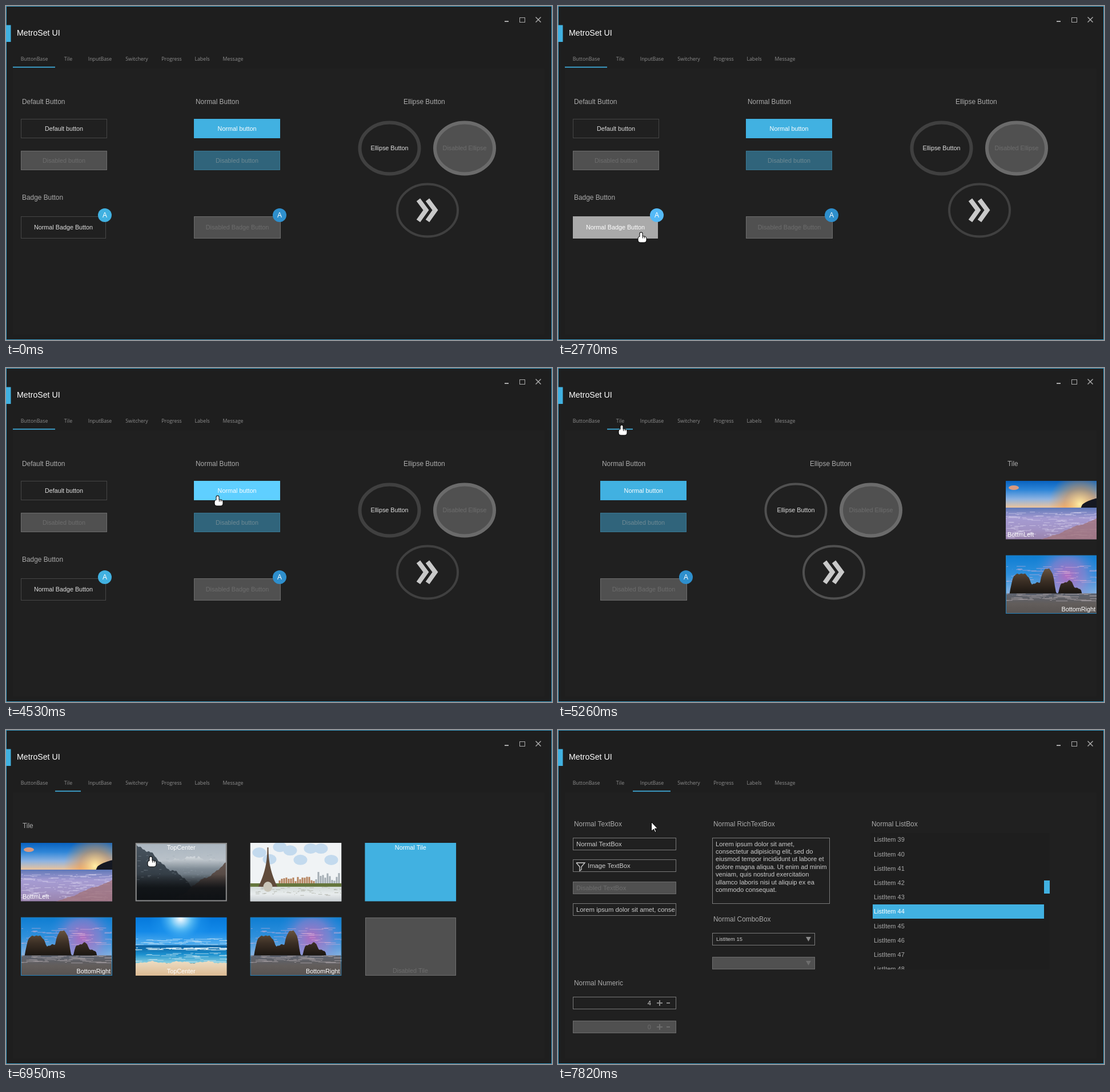
Write an HTML page with a canvas that moves like this. It is 956 by 586 pixels and loops after 8000 ms.

```html
<!DOCTYPE html>
<html lang="en">
<head>
<meta charset="utf-8">
<title>MetroSet UI</title>
<style>
html, body { margin: 0; width: 100%; height: 100%; overflow: hidden; background: #1e1e1e; }
canvas { display: block; }
</style>
</head>
<body>
<canvas id="stage" width="956" height="586"></canvas>
<script>
const c = document.getElementById('stage').getContext('2d');
const LOOP = 8000, PAGE_GAP = 1013, SLIDE_MS = 393;
const SLIDES = [5162, 7420];              // start of each page change
const BLUE = '#41b1e1', GREY = '#aaa', FILL = '#202020', INK = '#ccc', OFF = '#505050', OFF_INK = '#6d6d6d';
const SANS = '"Liberation Sans", Arial, sans-serif';
const TAB_FONT = '"Open Sans", "Noto Sans", sans-serif';

// Pointer moves: start, duration, then where it comes to rest
const MOVES = [
  [200, 730, 100, 244], [930, 90, 100, 220], [1320, 380, 400, 222], [1700, 420, 284, 278],
  [2120, 650, 145, 397], [2860, 150, 262, 396], [3010, 690, 722, 184], [3700, 110, 740, 218],
  [3870, 280, 737, 362], [4250, 500, 84, 116], [4750, 150, 111, 100], [5430, 140, 111, 173],
  [5620, 380, 115, 370], [6000, 350, 500, 380], [6350, 150, 505, 275], [6500, 280, 253, 222],
  [6950, 250, 146, 98], [7580, 160, 163, 161]
];
let mouse, hand, sliding;

function rect(x, y, w, h, fill, border) {
  c.fillStyle = fill;
  c.fillRect(x, y, w, h);
  if (border) {
    c.strokeStyle = border;
    c.lineWidth = 1;
    c.strokeRect(x + .5, y + .5, w - 1, h - 1);
  }
}
function text(s, x, y, color, size = 10.8, align = 'left', family = SANS) {
  c.font = `${size}px ${family}`;
  c.textAlign = align;
  c.fillStyle = color;
  c.fillText(s, x, y + size * .36);
}
const label = (s, x, y) => text(s, x, y, GREY, 11.9);
function poly(points, fill, stroke, width = 1) {
  c.beginPath();
  points.forEach(([x, y]) => c.lineTo(x, y));
  if (fill) { c.closePath(); c.fillStyle = fill; c.fill(); }
  if (stroke) { c.strokeStyle = stroke; c.lineWidth = width; c.stroke(); }
}
function oval(x, y, rx, ry, fill, border, width) {
  c.beginPath();
  c.ellipse(x, y, rx, ry, 0, 0, 7);
  c.fillStyle = fill;
  c.fill();
  if (border) { c.strokeStyle = border; c.lineWidth = width; c.stroke(); }
}
function clipped(x, y, w, h, draw) {
  c.save();
  c.beginPath();
  c.rect(x, y, w, h);
  c.clip();
  draw();
  c.restore();
}
function blend(gradient, colors) {
  colors.forEach((color, i) => gradient.addColorStop(i / (colors.length - 1), color));
  return gradient;
}
const fade = (y0, y1, ...colors) => blend(c.createLinearGradient(0, y0, 0, y1), colors);
const glow = (x, y, r, ...colors) => blend(c.createRadialGradient(x, y, 0, x, y, r), colors);

function hot(inside) {
  if (inside) hand = true;
  return inside;
}
const hotRect = (x, y, w, h) =>
  hot(!sliding && mouse.x >= x && mouse.x < x + w && mouse.y >= y && mouse.y < y + h);
const hotOval = (x, y, rx, ry) =>
  hot(!sliding && Math.hypot((mouse.x - x) / rx, (mouse.y - y) / ry) < 1);

// Buttons page
function button(s, x, y, w, h, kind) {
  let look = { plain: [FILL, '#464646', '#ddd'], blue: [BLUE, BLUE, '#fff'],
    off: [OFF, OFF_INK, OFF_INK], blueOff: ['#30647b', '#3a7893', '#6f8a94'] }[kind];
  const over = !/off/i.test(kind) && hotRect(x, y, w, h);
  if (over) look = kind === 'blue' ? ['#5fcfff', '#5fcfff', '#fff'] : [GREY, GREY, '#fff'];
  rect(x, y, w, h, look[0], look[1]);
  text(s, x + w / 2, y + h / 2, look[2], 10.8, 'center');
  return over;
}
function badge(x, color) {
  oval(x, 367, 12, 12, color);
  text('A', x, 366.5, '#fff', 12, 'center');
}
function ellipseButton(s, x, y, width, ink = '#ddd') {
  const over = hotOval(x, y, 55, 48);
  const ring = over ? GREY : sliding ? '#505050' : '#404040';
  oval(x, y, 55 - width / 2, 48 - width / 2, over ? GREY : FILL, ring, width);
  text(s, x, y, over ? '#fff' : ink, 10.8, 'center');
}
function buttonsPage() {
  label('Default Button', 28, 168);
  label('Normal Button', 332, 168);
  label('Ellipse Button', 696, 168);
  label('Badge Button', 28, 336);
  button('Default button', 26, 198, 151, 34, 'plain');
  button('Disabled button', 26, 254, 151, 34, 'off');
  button('Normal button', 329, 198, 151, 34, 'blue');
  button('Disabled button', 329, 254, 151, 34, 'blueOff');
  const over = button('Normal Badge Button', 26, 369, 149, 39, 'plain');
  badge(173, over ? '#55baf7' : BLUE);
  button('Disabled Badge Button', 329, 369, 152, 39, 'off');
  badge(479, '#2e8fcd');
  ellipseButton('Ellipse Button', 671.5, 249.5, sliding ? 4 : 6);
  oval(803, 249.5, 52, 45, OFF, '#6b6b6b', 6);
  text('Disabled Ellipse', 803, 249.5, OFF_INK, 10.8, 'center');
  ellipseButton('', 738, 358.5, 4);
  for (const x of [722, 738]) poly([[x, 340], [x + 13.5, 358], [x, 377]], null, '#c9c9c9', 8);
}

// Pictures, 160 by 103, built from ridges and seeded specks
const random = n => Math.abs(Math.sin(n * 12.9898) * 43758.5453) % 1;
const rough = (x, seed) => Math.sin(x * .13 + seed) + Math.sin(x * .31 + seed * 2) / 2 + Math.sin(x * .9 + seed * 3) / 3;
const hump = (x, middle, half, height) => Math.max(0, height * (1 - ((x - middle) / half) ** 4));

function ridge(fill, top) {
  const points = [[160, 103], [0, 103]];
  for (let x = 0; x <= 160; x += 2) points.push([x, top(x)]);
  poly(points, fill);
}
function specks(count, color, y0, y1, length) {
  for (let i = 0; i < count; i++) {
    const w = length * random(i + 9);
    rect(random(i + 1) * 170 - 10, y0 + random(i + .5) * (y1 - y0), w, 1, color);
  }
}
function sunset() {
  rect(0, 0, 160, 48, fade(0, 48, '#0862c0', '#2f86d8', '#8db3e2', '#f3c596'));
  rect(60, 0, 100, 48, glow(130, 41, 55, '#fff0a8', '#f59a4088', '#f59a4000'));
  oval(14, 12, 9, 4, '#d99a80');
  ridge('#151822', x => x < 132 ? 60 : 46 - 3 * Math.sqrt(x - 132));
  rect(0, 47, 160, 56, fade(47, 103, '#5f78b8', '#a59bd2', '#a294c6', '#9a83ac'));
  specks(200, '#e0daf088', 54, 100, 16);
  ridge('#a0747ccc', x => 128 - x * .39 + rough(x, 2));
}
function mountains() {
  rect(0, 0, 160, 60, fade(0, 60, '#a9b4be', '#c9cfd4'));
  ridge(fade(22, 70, '#dde2e6', '#7e8a94', '#59646d'), x => 34 - hump(x, 84, 22, 8) - hump(x, 122, 25, 7) + 3 * rough(x, 4));
  ridge(fade(0, 100, '#4a5661', '#37414a', '#1d2226'), x => x * .75 + 3 * rough(x, 1));
  specks(90, '#96a3ad66', 20, 70, 6);
  ridge(fade(36, 100, '#645650', '#382f2d'), x => 36 + (160 - x) * .68 + 2 * rough(x, 3));
  rect(0, 55, 160, 48, fade(55, 103, '#0e111400', '#0e1114dd', '#0e1114'));
}
function city() {
  rect(0, 0, 160, 103, '#f0f3f5');
  for (let i = 0; i < 8; i++) oval(16 + i * 18, 17 + 13 * Math.sin(i * 2), 12, 9, '#c3daee');
  for (let x = 50; x < 156; x += 4) {
    const h = 6 + 10 * random(x) + (x > 115 ? 12 * random(x + 1) : 0);
    rect(x, 75 - h, 3, h, x > 110 ? '#a4adb4' : '#b5835e');
  }
  rect(0, 71, 160, 6, '#65763d');
  rect(0, 77, 160, 26, fade(77, 103, '#d5dcda', '#e8eced', '#c6ccd0'));
  specks(60, '#b5b8b0', 77, 92, 8);
  for (let y = 8; y < 77; y++) {
    const half = 1 + 16 * ((y - 8) / 69) ** 2.2;
    rect(31 - half, y, half * 2, 1, '#604b3b');
  }
  oval(31, 77, 8, 9, '#c9c5b8');
}
function rocks() {
  rect(0, 0, 160, 68, fade(0, 68, '#0e7dd2', '#2f90dc', '#8fb6e2'));
  rect(0, 0, 160, 68, glow(108, 36, 62, '#b06cc0', '#9a80cc99', '#278ee000'));
  specks(60, '#e0b4d888', 18, 48, 26);
  ridge(fade(22, 70, '#6a5540', '#3a2e24', '#17130f'), x => 70 - 2.5 * rough(x, 5) -
    Math.max(hump(x, 28, 22, 36), hump(x, 73, 15, 43), hump(x, 50, 42, 22), hump(x, 106, 15, 24), hump(x, 124, 10, 12)));
  rect(0, 67, 160, 36, fade(67, 103, '#5d6370', '#625d5b', '#575250'));
  specks(60, '#9a9498', 67, 80, 26);
  c.strokeStyle = '#2582bd';
  c.lineWidth = 1;
  c.strokeRect(.5, .5, 159, 101.5);
}
function sea() {
  rect(0, 0, 160, 50, fade(0, 50, '#0579dc', '#1389e8', '#5ab2ee'));
  rect(0, 0, 160, 50, glow(79, 2, 55, '#ffffff', '#5dbdf4', '#239aef66', '#239aef00'));
  specks(50, '#cfe6f599', 37, 49, 30);
  rect(0, 49, 160, 32, fade(49, 81, '#0c5f9f', '#1b90cf', '#8fd3e2'));
  specks(45, '#e6f4f8', 53, 57, 26);
  specks(40, '#d9eff5aa', 62, 78, 26);
  ridge(fade(77, 103, '#ecdcc2', '#dcba92'), x => 79 + 1.5 * rough(x, 1));
}

// Tiles page
function tile(picture, col, row, s, align, bottom) {
  const x = 26 + col * 200.75, y = 198 + row * 130.5;
  clipped(x, y, 160, 102.5, () => {
    c.translate(x, y);
    picture();
  });
  if (hotRect(x, y, 160, 102)) {
    c.strokeStyle = '#8c8c8c';
    c.lineWidth = 2;
    c.strokeRect(x + 1, y + 1, 158, 100.5);
  }
  const inset = { left: 3, center: 80, right: 157 }[align];
  text(s, x + inset, y + (bottom ? 94.3 : 8), '#fff', 10.8, align);
}
function tilesPage() {
  label('Tile', 29, 168);
  tile(sunset, 0, 0, 'BottmLeft', 'left', true);
  tile(mountains, 1, 0, 'TopCenter', 'center');
  tile(city, 2, 0, '', 'center');
  tile(() => rect(0, 0, 160, 103, BLUE), 3, 0, 'Normal Tile', 'center');
  tile(rocks, 0, 1, 'BottomRight', 'right', true);
  tile(sea, 1, 1, 'TopCenter', 'center', true);
  tile(rocks, 2, 1, 'BottomRight', 'right', true);
  rect(629, 329, 159, 102, OFF, OFF_INK);
  text('Disabled Tile', 708, 422.5, OFF_INK, 10.8, 'center');
}

// Inputs page
const LOREM = ['Lorem ipsum dolor sit amet,', 'consectetur adipisicing elit, sed do',
  'eiusmod tempor incididunt ut labore et', 'dolore magna aliqua. Ut enim ad minim',
  'veniam, quis nostrud exercitation', 'ullamco laboris nisi ut aliquip ex ea', 'commodo consequat.'];

function field(x, y, w, h, off) {
  rect(x, y, w, h, off ? OFF : FILL, off ? OFF_INK : '#7a7a7a');
}
function textBox(s, y, off, indent = 0) {
  field(26, y, 181, 22, off);
  clipped(28, y, 177, 22, () => text(s, 32 + indent, y + 10.5, off ? OFF_INK : INK, 11.3));
}
function numeric(y, value, off) {
  const color = off ? OFF_INK : '#888';
  field(26, y, 181, 22, off);
  text(value, 163, y + 11, off ? color : INK, 11.2, 'right');
  rect(173, y + 10, 10, 2, color);
  rect(177, y + 6, 2, 10, color);
  rect(190, y + 10, 6, 2, color);
}
function combo(y, s, off) {
  field(270, y, 180, 22, off);
  text(s, 277, y + 11, INK, 9.4);
  poly([[434, y + 7], [443, y + 7], [438.5, y + 15]], off ? OFF_INK : '#888');
}
function listBox() {
  rect(547, 181, 314, 239, '#1e1e1e');
  for (let i = 0; i < 10; i++) {
    const y = 192.5 + i * 25.2, selected = i === 5;
    if (selected) rect(551, 306, 300, 25, BLUE);
    text('ListItem ' + (39 + i), 553, y, selected ? '#fff' : GREY, 11);
  }
  rect(851, 264, 10, 23, BLUE);
}
function inputsPage() {
  label('Normal TextBox', 28, 164.5);
  label('Normal RichTextBox', 272, 164.5);
  label('Normal ListBox', 549, 164.5);
  label('Normal ComboBox', 272, 331.5);
  label('Normal Numeric', 28, 444);
  textBox('Normal TextBox', 189);
  textBox('Image TextBox', 227, false, 20);
  poly([[32, 233], [47, 233], [41, 240], [41, 245], [38, 247], [38, 240], [32, 233]], null, INK, 1.3);
  textBox('Disabled TextBox', 266, true);
  textBox('Lorem ipsum dolor sit amet, consectetur', 304);
  field(270, 189, 206, 116);
  LOREM.forEach((line, i) => text(line, 276, 199.5 + i * 13.4, INK, 11.2));
  combo(356, 'ListItem 15');
  combo(398, '', true);
  numeric(468, '4');
  numeric(510, '0', true);
  clipped(547, 181, 314, 239, listBox);
}

// Window
const TABS = ['ButtonBase', 'Tile', 'InputBase', 'Switchery', 'Progress', 'Labels', 'Message'];
const TAB_EDGES = [12, 86, 131, 197, 260, 319, 367, 427];
const PAGES = [buttonsPage, tilesPage, inputsPage];

function chrome(page) {
  rect(0, 0, 956, 586, '#1e1e1e', '#3a9bc5');
  rect(12, 110, 931, 466, FILL);
  rect(0, 33.5, 8.5, 29.5, BLUE);
  text('MetroSet UI', 19, 47, '#fff', 14.2);
  rect(873, 26, 7, 2, GREY);
  c.strokeStyle = GREY;
  c.lineWidth = 1;
  c.strokeRect(899.5, 20.5, 9, 8);
  poly([[927.5, 19.5], [936.5, 28.5]], null, GREY, 1.5);
  poly([[936.5, 19.5], [927.5, 28.5]], null, GREY, 1.5);
  TABS.forEach((name, i) =>
    text(name, (TAB_EDGES[i] + TAB_EDGES[i + 1]) / 2 + .5, 92.5, '#8e8e8e', 8.8, 'center', TAB_FONT));
  rect(TAB_EDGES[page], 106.5, TAB_EDGES[page + 1] - TAB_EDGES[page], 1.7, BLUE);
}
function drawPage(index, offset) {
  c.save();
  c.translate(offset, 0);
  PAGES[index]();
  c.restore();
}
function pointerAt(t) {
  let x = 745, y = 572;
  for (const [start, duration, toX, toY] of MOVES) {
    const k = Math.min(1, Math.max(0, (t - start) / duration));
    x += (toX - x) * k;
    y += (toY - y) * k;
  }
  return { x: Math.round(x), y: Math.round(y) };
}
function drawPointer() {
  c.save();
  c.translate(mouse.x + .5, mouse.y + .5);
  if (hand) {
    c.beginPath();
    c.roundRect(-2, 0, 4, 12, 2);
    c.roundRect(-5, 7, 14, 10, 4);
    c.strokeStyle = '#000';
    c.lineWidth = 2;
    c.stroke();
    c.fillStyle = '#fff';
    c.fill();
    for (const x of [3, 6]) rect(x - .5, 7, 1, 3, '#000');
  } else {
    poly([[0, 0], [0, 16], [4, 12.5], [6.5, 18], [8.5, 17], [6, 11.5], [11, 11.5], [0, 0]], '#fff', '#000');
  }
  c.restore();
}
function draw(t) {
  const page = SLIDES.filter(start => t >= start).length;
  const progress = page ? Math.min(1, (t - SLIDES[page - 1]) / SLIDE_MS) : 1;
  sliding = progress < 1;
  mouse = pointerAt(t);
  hand = mouse.y > 80 && mouse.y < 109;
  chrome(page);
  clipped(12, 110, 931, 466, () => {
    const shift = PAGE_GAP * (1 - progress);
    if (sliding) drawPage(page - 1, Math.round(shift - PAGE_GAP));
    drawPage(page, Math.round(shift));
  });
  if (t >= 200) drawPointer();
}
function frame() {
  draw(performance.now() % LOOP);
  requestAnimationFrame(frame);
}
frame();
</script>
</body>
</html>
```
